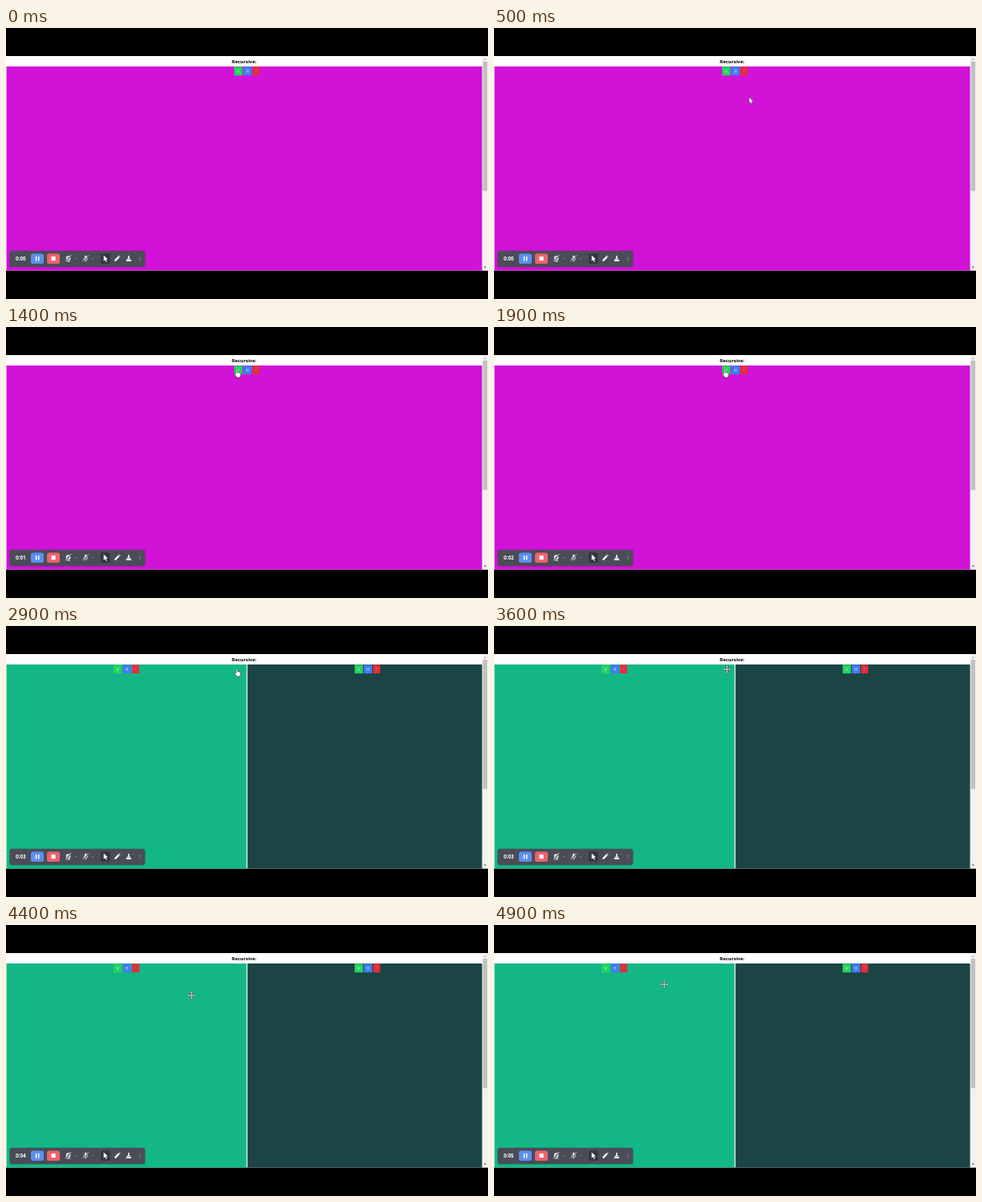
Animation of 600 by 338 pixels, one loop 5000 ms. Source, as an HTML page:

```html
<!DOCTYPE html>
<html lang="en">
<head>
<meta charset="utf-8">
<title>Recursive panes</title>
<style>
  html, body { margin: 0; width: 100%; height: 100%; overflow: hidden; background: #000; }
  svg { display: block; width: 600px; height: 338px; }
  text { font-family: "Noto Sans", "Open Sans", sans-serif; }
  .title { font-size: 6px; font-weight: 700; text-anchor: middle; }
  .label { font-size: 5px; fill: #e6ecf8; text-anchor: middle; }
  .time { font-size: 6.3px; font-weight: 700; fill: #fff; }

  .whole, .split, .clock, .arrow, .hand, .move { animation: 5s step-end infinite; }
  .whole { animation-name: whole; }
  .split { animation-name: split; }
  .clock { animation-name: clock; }
  .arrow { animation-name: arrow; }
  .hand { animation-name: hand; }
  .move { animation-name: move; }
  .pointer { animation: travel 5s infinite; }

  @keyframes whole { 0% { opacity: 1; } 58%, 100% { opacity: 0; } }
  @keyframes split { 0% { opacity: 0; } 58%, 100% { opacity: 1; } }
  @keyframes arrow { 0% { opacity: 0; } 4% { opacity: 1; } 12%, 100% { opacity: 0; } }
  @keyframes hand { 0% { opacity: 0; } 12% { opacity: 1; } 72%, 100% { opacity: 0; } }
  @keyframes move { 0% { opacity: 0; } 72%, 100% { opacity: 1; } }
  @keyframes clock {
    0% { transform: translateY(0); }
    18% { transform: translateY(-20px); }
    38% { transform: translateY(-40px); }
    58% { transform: translateY(-60px); }
    78% { transform: translateY(-80px); }
    98%, 100% { transform: translateY(-100px); }
  }
  /* the pointer advances once every 100 ms */
  @keyframes travel {
    0% { transform: translate(380px, 170px); animation-timing-function: step-end; }
    4% { transform: translate(380px, 170px); animation-timing-function: steps(4); }
    12% { transform: translate(300px, 64px); animation-timing-function: steps(4); }
    20% { transform: translate(290px, 62px); animation-timing-function: step-end; }
    24% { transform: translate(290px, 62px); animation-timing-function: steps(2); }
    28% { transform: translate(288px, 58px); animation-timing-function: step-end; }
    72% { transform: translate(290px, 54px); animation-timing-function: steps(4); }
    80% { transform: translate(262px, 76px); animation-timing-function: steps(4); }
    88% { transform: translate(231px, 88px); animation-timing-function: steps(3); }
    94%, 100% { transform: translate(212px, 74px); }
  }
</style>
</head>
<body>
<svg viewBox="0 0 600 338">
  <defs>
    <g id="buttons">
      <path fill="#24d45f" d="M-16 48.3h10.4v10.9H-16z"/>
      <path fill="#3f7df3" d="M-4.6 48.3h10.4v10.9H-4.6z"/>
      <path fill="#e22f3d" d="M6.9 48.3h8.9v10.9H6.9z"/>
      <text class="label" x="-10.9" y="55.5">V</text>
      <text class="label" x=".6" y="55.5">H</text>
      <text class="label" x="11.3" y="55.3">-</text>
    </g>
    <clipPath id="slot"><path d="M8 280h22v16H8z"/></clipPath>
  </defs>

  <path d="M0 35h600v267.5H0z" fill="#fff"/>
  <text class="title" x="296.3" y="43.6">Recursive:</text>

  <g class="whole">
    <path d="M.6 48h598.8v254.5H.6z" fill="#d112d7"/>
    <use href="#buttons" x="300"/>
  </g>
  <g class="split">
    <path d="M.6 48h298.8v254.5H.6z" fill="#13b785"/>
    <path d="M300.6 48h298.8v254.5H300.6z" fill="#1b4444"/>
    <use href="#buttons" x="150"/>
    <use href="#buttons" x="450"/>
  </g>

  <!-- scrollbar -->
  <path d="M592.6 35H600v267.5h-7.4z" fill="#f1f1f1"/>
  <path d="M593.6 42h5.4v161.3h-5.4z" fill="#c1c1c1"/>
  <path d="M594.8 40l1.6-1.8 1.6 1.8z" fill="#a3a3a3"/>
  <path d="M594.8 297.4l1.6 1.8 1.6-1.8z" fill="#505050"/>

  <!-- recorder bar -->
  <rect x="4" y="277.6" width="169.6" height="21.2" rx="3.6" fill="#000" opacity=".18"/>
  <rect x="4.6" y="278" width="168.4" height="20" rx="3" fill="#4a4d57"/>
  <g clip-path="url(#slot)">
    <g class="clock time">
      <text x="12" y="289.8">0:00</text>
      <text x="12" y="309.8">0:01</text>
      <text x="12" y="329.8">0:02</text>
      <text x="12" y="349.8">0:03</text>
      <text x="12" y="369.8">0:04</text>
      <text x="12" y="389.8">0:05</text>
    </g>
  </g>
  <rect x="31" y="281.4" width="16" height="12.6" rx="2.6" fill="#5c8ff0"/>
  <path d="M36.8 285h1.5v5.4h-1.5zM39.9 285h1.5v5.4h-1.5z" fill="#fff"/>
  <rect x="51" y="281.4" width="16" height="12.6" rx="2.6" fill="#ee626b"/>
  <rect x="56.4" y="285.1" width="5.2" height="5.2" rx=".6" fill="#fff"/>

  <g fill="none" stroke="#fff" stroke-linecap="round">
    <circle cx="77.6" cy="287" r="2.1" stroke-width="1.5"/>
    <path d="M75.8 291h3.6" stroke-width="1"/>
    <path d="M74.4 291l6.6-7.2" stroke="#4a4d57" stroke-width="1.8"/>
    <path d="M74.2 290.6l6.6-7.2" stroke-width=".8"/>
    <path d="M99.2 285v2" stroke-width="2.3"/>
    <path d="M96.8 287.2a2.4 2.4 0 0 0 4.8 0M99.2 289.6v1.6" stroke-width=".8"/>
    <path d="M96.2 291.2l6.4-7" stroke="#4a4d57" stroke-width="1.6"/>
    <path d="M96 290.8l6.4-7" stroke-width=".8"/>
    <path d="M86.3 287.6l.7.6.7-.6M107.3 287.6l.7.6.7-.6" stroke="#b9bbc2" stroke-width=".6"/>
    <path d="M167.4 285.5l-1.7 2.1 1.7 2.1" stroke="#a4a7b0" stroke-width=".7"/>
  </g>
  <rect x="118" y="281.3" width="11.4" height="12.8" rx="1.8" fill="#34363e"/>
  <g fill="#fff">
    <path d="M121.6 283.6l5.2 4.9-2.4.2 1.4 2.6-1.2.6-1.3-2.7-1.7 1.6z"/>
    <path d="M135 290.9l.5-2.2 4.3-4.3 1.7 1.7-4.3 4.3zM140.3 283.9l.6-.5 1.7 1.7-.6.5z"/>
    <path d="M152 284h1.4v2.6l1.5 1.6h-4.4l1.5-1.6zM150 288.8h5.4l.6 2.3h-6.6z"/>
  </g>

  <g class="pointer" fill="#fff" stroke="#222" stroke-width=".5" stroke-linejoin="round">
    <path class="arrow" d="M-2.5-4.5v8.3l1.9-1.7 1.3 2.9 1.3-.6-1.3-2.8h2.6z"/>
    <path class="hand" d="M-1.7-4.2q.9-1 1.7 0v3l1.3.1q.5-.2.9.3l1 .2q.9.2.9 1.2v1.5l-.9 1.8v1.1h-4.4v-1L-3.2 1.2q-.5-1 .3-1.2l1.2.9z"/>
    <path class="move" d="M0-4.8L1.9-2.7H.7V-.7H2.7V-1.9L4.8 0 2.7 1.9V.7H.7V2.7H1.9L0 4.8-1.9 2.7H-.7V.7H-2.7V1.9L-4.8 0-2.7-1.9V-.7H-.7V-2.7H-1.9z"/>
  </g>
</svg>
</body>
</html>
```
